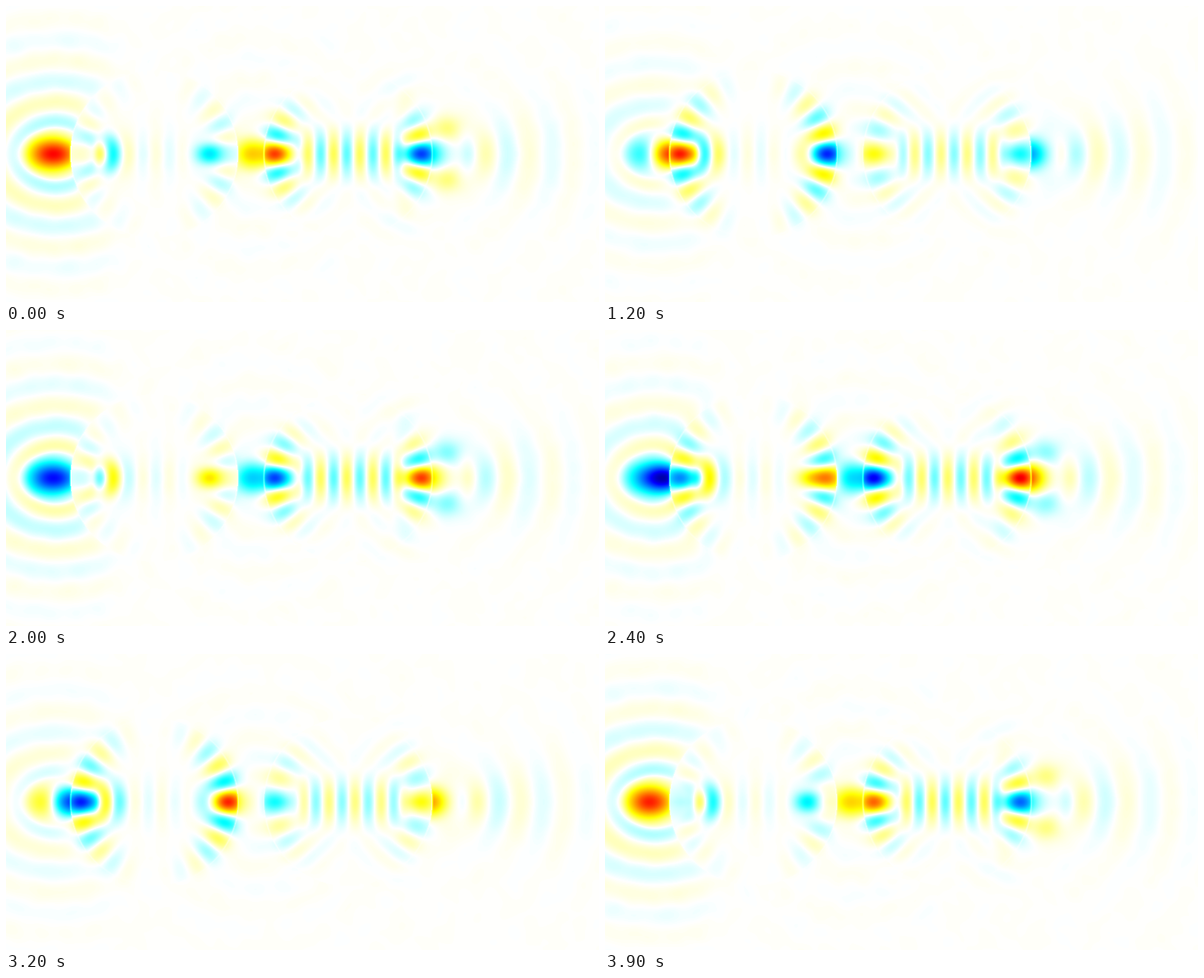
A matplotlib script that plays this animation: 800x400 px, repeating every 4 s.

```python
import numpy as np
import matplotlib.pyplot as plt
from matplotlib.animation import FuncAnimation
from matplotlib.colors import LinearSegmentedColormap
from numpy.polynomial.legendre import Legendre

W, H, FRAMES = 800, 400, 40
TAU = 2 * np.pi
ORDER = 13
LENSES = ((200, 113), (461.5, 113.5))

X, Y = np.meshgrid(np.arange(W) + 0.5, np.arange(H) + 0.5)
D = np.abs(Y - H / 2)
RADII = [np.hypot(X - cx, D) for cx, _ in LENSES]
INSIDE = [rho < R for rho, (_, R) in zip(RADII, LENSES)]
OUTSIDE = ~(INSIDE[0] | INSIDE[1])


def dist(cx, squash=1.0):
    return np.hypot((X - cx) / squash, D)


def phase(step):
    """Unit phasor that peaks at the given time step."""
    return np.exp(1j * TAU * step / FRAMES)


def wave(r, start, length):
    """Wave running towards larger r, with a crest at start."""
    return np.exp(1j * TAU * (r - start) / length)


def gauss(v, width):
    return np.exp(-0.5 * (v / width) ** 2)


def ramp(v, edge, width):
    return 1 / (1 + np.exp(-np.clip((v - edge) / width, -50, 50)))


def blob(cx, sx, sy, amp, peak, dy=0):
    return amp * gauss(X - cx, sx) * gauss(D - dy, sy) * phase(peak)


def gallery(lens, amp, peak, depth, spread):
    """Standing surface mode of a sphere with a weaker outward drift."""
    (cx, R), rho = LENSES[lens], RADII[lens]
    c = (X - cx) / rho
    t = np.arccos(np.clip(np.abs(c), 0, 1))
    k = ORDER + 0.5
    standing = Legendre.basis(ORDER)(c)
    drift = (np.sign(c) * np.sqrt(2 / (np.pi * k * np.maximum(np.sin(t), 0.05)))
             * np.sin(k * t - np.pi / 4) * (1 - np.exp(-(t / 0.35) ** 2)))
    jump = 1 - 0.5 * gauss(t, 0.2)
    tail = jump * gauss(R - 99, depth) * np.exp(-np.maximum(rho - R, 0) / 10)
    radial = np.where(rho < R, gauss(rho - 99, depth), tail)
    envelope = amp * np.abs(c) * gauss(t, spread) * radial
    return envelope * (standing + 0.4j * drift) * phase(peak)


def left_side():
    r = dist(70, 1.25)
    a = TAU * (r - 71) / 56
    rings = 0.11 * np.exp(-(r - 43) / 65) * ramp(r, 34, 3) * ramp(-X, -145, 12)
    rings = rings * (0.85 * np.cos(a) + 0.2j * np.sin(a)) * phase(-1.5)
    focus = blob(58, 20, 15, 0.65, -1) + blob(80, 15, 13, 0.72, 8)
    return np.where(INSIDE[0], 0.5 * rings, rings + focus)


def first_lens():
    r = dist(97)
    angle = np.arctan2(D, X - 97)
    back = -0.28 * gauss(r - 40, 15) * gauss(angle, 0.38) * np.conj(wave(r, 50, 50))
    core = 0.03 * gauss(X - 200, 35) * gauss(D, 25) * np.conj(wave(X, 203, 37))
    inner = back * ramp(X, 119, 3) + core + blob(274, 12, 10, -0.3, -2)
    return gallery(0, -0.76, 9.6, 15, 0.85) + np.where(INSIDE[0], inner, 0)


def gap():
    r = dist(331)
    rings = 0.03 * ramp(r, 30, 4) * np.exp(-r / 80) * wave(r, 45, 56)
    return np.where(OUTSIDE, blob(330, 16, 14, 0.32, 1.5) + rings, 0)


def second_lens():
    span = ramp(X, 396, 5) * ramp(-X, -535, 5) * gauss(D, 19)
    k = TAU * (X - 407) / 35.2
    stripes = span * (0.11 * np.exp(1j * k) + 0.045 * np.cos(k))
    near, far = dist(363), dist(565)
    arc_span = (1 - gauss(D, 22)) * ramp(X, 375, 8) * ramp(-X, -550, 8)
    arcs = 0.022 * arc_span * (
        gauss(near - 60, 35) * wave(near, 44, 35.2)
        + gauss(far - 60, 35) * np.conj(wave(far, 158, 35.2)))
    return gallery(1, -0.78, 4, 14, 0.5) + np.where(INSIDE[1], stripes, 0) + arcs


def right_side():
    r = dist(575)
    angle = np.arctan2(D, X - 575)
    beam = gauss(angle, 0.28) + 0.2 * gauss(angle, 0.8)
    rings = 0.065 * ramp(r, 45, 6) * np.exp(-(r - 65) / 85) * beam * wave(r, 73, 60)
    spots = blob(596, 13, 12, 0.12, 1, dy=35)
    exit_glow = blob(575, 14, 13, -0.45, 8)
    return np.where(INSIDE[1] | (X < 480), 0, rings + spots + exit_glow)


def ripple():
    """Barely visible background unevenness."""
    rng = np.random.default_rng(4)
    total = np.zeros((H, W), complex)
    for _ in range(14):
        kx, ky = rng.normal(0, 0.11, 2)
        total += np.cos(kx * X + rng.uniform(0, TAU)) * np.cos(ky * D) * phase(rng.uniform(0, FRAMES))
    return 0.0012 * total


def rim():
    """Thin pale seam where the field jumps at a lens surface."""
    seam = np.ones((H, W))
    for (cx, R), rho in zip(LENSES, RADII):
        seam -= 0.5 * np.abs(X - cx) / rho * np.exp(-((rho - R) / 1.2) ** 2)
    return seam


field = rim() * (left_side() + first_lens() + gap() + second_lens() + right_side()) + ripple()

cmap = LinearSegmentedColormap.from_list("field", [
    (0, (0, 0, 0.5)), (0.125, (0, 0, 1)), (0.375, (0, 1, 1)), (0.5, (1, 1, 1)),
    (0.625, (1, 1, 0)), (0.875, (1, 0, 0)), (1, (0.5, 0, 0))], N=512)

fig = plt.figure(figsize=(W / 100, H / 100), dpi=100)
ax = fig.add_axes([0, 0, 1, 1])
ax.axis("off")
image = ax.imshow(field.real, cmap=cmap, vmin=-1, vmax=1, aspect="auto",
                  interpolation="nearest")


def draw(i):
    image.set_data((field * phase(-i)).real + 0.003)
    return [image]


anim = FuncAnimation(fig, draw, frames=FRAMES, interval=100, repeat=True,
                     repeat_delay=0, blit=False)
plt.show()
```
